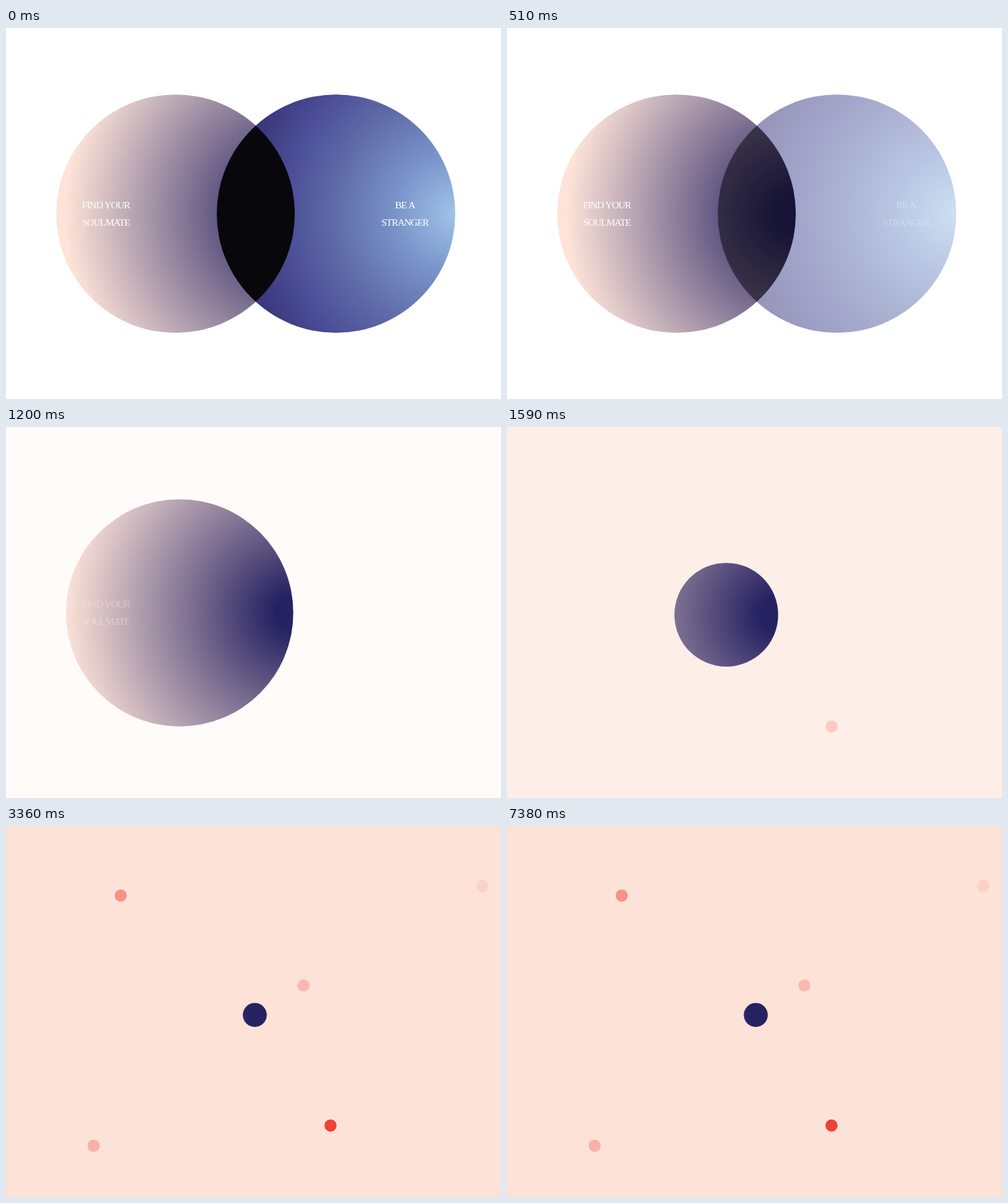
An HTML page with a canvas for the animation above (7410 ms loop, 768x576 px).

```html
<!DOCTYPE html>
<html lang="en">
<head>
<meta charset="utf-8">
<title>Two circles</title>
<style>
html, body { margin: 0; width: 100%; height: 100%; overflow: hidden; background: #fff; }
canvas { display: block; }
</style>
</head>
<body>
<canvas id="stage" width="768" height="576"></canvas>
<script>
const ctx = document.getElementById('stage').getContext('2d');
const LOOP = 7410, STEP = 30;

const PEACH = [252, 226, 215];
const RED = '#ef4136';
const WARM = [[0, '#262262'], [0.08, '#262262'], [1, '#fde3d8']];
const COOL = [[0, '#a0c4e8'], [0.25, '#7a94ca'], [0.5, '#606ca8'],
              [0.7, '#4c5098'], [0.9, '#3a367c'], [1, '#2c2468']];

// x, y, final opacity, fade start, fade end
const DOTS = [
  [503.5, 465, 1, 1400, 2350],
  [178, 108, 0.5, 2280, 3360],
  [136, 496.5, 0.3, 2280, 3360],
  [461.5, 247.5, 0.25, 2280, 3360],
  [739, 93, 0.1, 2280, 3360]
];

const ramp = (t, a, b) => Math.min(1, Math.max(0, (t - a) / (b - a)));
const smooth = p => p * p * (3 - 2 * p);
const mix = (a, b, p) => a + (b - a) * p;

function disc(c, fill, alpha = 1) {
  ctx.globalAlpha = alpha;
  ctx.fillStyle = fill;
  ctx.beginPath();
  ctx.arc(c.x, c.y, c.r, 0, Math.PI * 2);
  ctx.fill();
  ctx.globalAlpha = 1;
}

// Rings spread from the rightmost point of the circle.
function rings(c, reach, stops) {
  const x = c.x + c.r;
  const g = ctx.createRadialGradient(x, c.y, 0, x, c.y, reach);
  for (const [at, color] of stops) g.addColorStop(at, color);
  return g;
}

// Prefer the narrow cut of the serif where it is installed.
const faces = [
  px => `300 extra-condensed ${px}px "Noto Serif", serif`,
  px => `${px}px "Liberation Serif", "Times New Roman", serif`
].map(face => {
  ctx.font = face(100);
  return { face, size: Math.min(24, 8200 / ctx.measureText('SOULMATE').width) };
});
const type = faces.sort((a, b) => b.size - a.size)[0];

function label(lines, x, alpha) {
  if (alpha <= 0) return;
  ctx.font = type.face(type.size);
  ctx.letterSpacing = '-1px';
  ctx.textAlign = 'center';
  ctx.fillStyle = '#fff';
  ctx.globalAlpha = alpha;
  lines.forEach((line, i) => ctx.fillText(line, x, 275 + 27 * i + type.size * 0.33));
  ctx.globalAlpha = 1;
}

function draw(t) {
  const bg = PEACH.map(v => Math.round(mix(255, v, ramp(t, 1080, 1950))));
  ctx.fillStyle = `rgb(${bg})`;
  ctx.fillRect(0, 0, 768, 576);

  const p = smooth(ramp(t, 1080, 1950));
  const left = { x: mix(263, 386, p), y: mix(288.3, 293.3, p), r: mix(185, 18.6, p) };
  const right = { x: 512, y: 288.3, r: 185 };
  const fade = 1 - ramp(t, 0, 1080);

  if (fade > 0) disc(right, rings(right, 370, COOL), fade);
  disc(left, rings(left, 356, WARM));
  if (fade > 0) {
    ctx.save();
    ctx.beginPath();
    ctx.arc(left.x, left.y, left.r, 0, Math.PI * 2);
    ctx.clip();
    disc(right, '#08070c', fade);
    ctx.restore();
  }

  label(['FIND YOUR', 'SOULMATE'], 155, 1 - ramp(t, 780, 1430));
  label(['BE A', 'STRANGER'], 619, 1 - ramp(t, 0, 780));

  for (const [x, y, level, from, to] of DOTS) {
    disc({ x, y, r: 9.4 }, RED, level * ramp(t, from, to));
  }
}

let start = null;
function tick(now) {
  if (start === null) start = now;
  const t = (now - start) % LOOP;
  draw(Math.floor(t / STEP) * STEP);
  requestAnimationFrame(tick);
}
draw(0);
requestAnimationFrame(tick);
</script>
</body>
</html>
```
